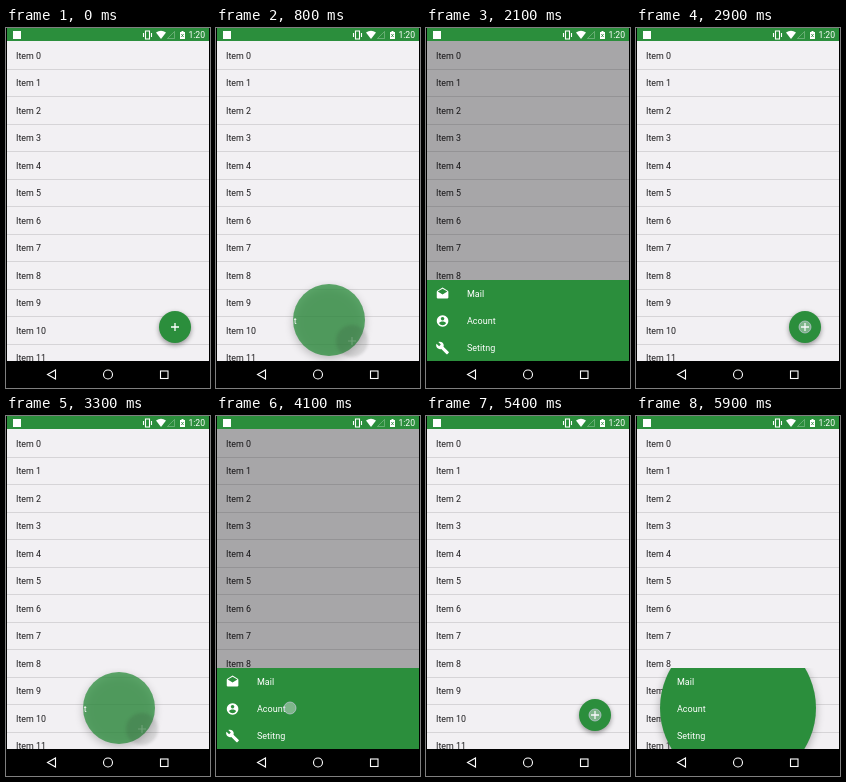
An HTML page with a canvas that plays this animation: 204x360 px, repeating every 6 s.

```html
<!DOCTYPE html>
<html lang="en">
<head>
<meta charset="utf-8">
<title>Button to sheet</title>
<style>
html, body { margin: 0; width: 100%; height: 100%; overflow: hidden; background: #000; }
canvas { display: block; width: 204px; height: 360px; }
</style>
</head>
<body>
<canvas></canvas>
<script>
const W = 204, H = 360, LOOP = 6000, STEP = 100;
const GREEN = '#2b8e3c', PAPER = '#f2f0f3';
const HOME = [169, 299], OUTSIDE = [64, 224], ACCOUNT = [74, 292];
const SHEET = { x: 1, y: 252, w: 202, h: 81 };

// Stages of the morph: button at rest, arc, growing reveal, full sheet
const POSES = [[169, 299, 16], [136, 313, 16], [113, 292, 36], [102, 292, 78], [102, 292, 107], [102, 292, 120]];
const OPENINGS = [400, 2900, 5400], CLOSINGS = [2300, 5000];
const TOUCHES = [
  [400, 700, HOME], [2200, 2400, OUTSIDE], [2900, 3200, HOME],
  [4000, 4300, ACCOUNT], [4800, 5100, OUTSIDE], [5400, 5700, HOME]
];

const ROWS = [
  ['Mail', 'M12 1L3 6.3Q2 7 2 8V18Q2 20 4 20H20Q22 20 22 18V8Q22 7 21 6.3ZM12 13L3.7 7.8 12 3l8.3 4.8Z'],
  ['Acount', 'M12 2a10 10 0 1 0 .01 0ZM12 5a3 3 0 1 1-.01 0ZM6 16c0-2 4-3.1 6-3.1s6 1.1 6 3.1a7.2 7.2 0 0 1-12 0Z'],
  ['Setitng', 'M22.7 19l-9.1-9.1c.9-2.3.4-5-1.5-6.9-2-2-5-2.4-7.4-1.3L9 6 6 9 1.6 4.7c-1.2 2.4-.7 5.4 1.3 7.4 1.9 1.9 4.6 2.4 6.9 1.5l9.1 9.1c.4.4 1 .4 1.4 0l2.3-2.3c.5-.4.5-1.1.1-1.4z']
].map(([label, d]) => [label, new Path2D(d)]);

const canvas = document.querySelector('canvas');
const ctx = canvas.getContext('2d');
const ratio = window.devicePixelRatio || 1;
canvas.width = W * ratio;
canvas.height = H * ratio;

function rect(x, y, w, h, color) {
  ctx.fillStyle = color;
  ctx.fillRect(x, y, w, h);
}

function circle(x, y, r) {
  ctx.beginPath();
  ctx.arc(x, y, r, 0, Math.PI * 2);
}

function text(str, x, y, size, color) {
  ctx.font = `${size}px Roboto, sans-serif`;
  ctx.fillStyle = color;
  ctx.fillText(str, x, y);
}

function shape(d, fill, stroke, width = 1) {
  const path = new Path2D(d);
  if (fill) { ctx.fillStyle = fill; ctx.fill(path); }
  if (stroke) { ctx.strokeStyle = stroke; ctx.lineWidth = width; ctx.stroke(path); }
}

function shadow(blur, dy, alpha) {
  ctx.shadowColor = `rgba(0,0,0,${alpha})`;
  ctx.shadowBlur = blur * ratio;
  ctx.shadowOffsetY = dy * ratio;
}

function drawList() {
  rect(1, 13, 202, 320, PAPER);
  for (let i = 0; i < 12; i++) {
    const y = 13.5 + i * 27.5;
    text('Item ' + i, 10, y + 17, 8.9, '#1c1b1d');
    rect(1, Math.round(y + 27), 202, 1, '#d6d4d7');
  }
}

function drawButton(x, y) {
  ctx.save();
  shadow(5, 2, 0.4);
  circle(x, y, 16);
  ctx.fillStyle = GREEN;
  ctx.fill();
  ctx.restore();
  shape(`M${x - 4} ${y}h8M${x} ${y - 4}v8`, null, '#fff', 1.3);
}

function drawGhost(x, y) {
  ctx.save();
  ctx.filter = 'blur(1.5px)';
  circle(x, y, 16);
  ctx.fillStyle = 'rgba(40,50,45,.14)';
  ctx.fill();
  ctx.restore();
  shape(`M${x - 4} ${y}h8M${x} ${y - 4}v8`, null, 'rgba(255,255,255,.2)', 1.2);
}

function drawSheet([x, y, r], alpha) {
  ctx.save();
  ctx.beginPath();
  ctx.rect(SHEET.x, SHEET.y, SHEET.w, SHEET.h);
  ctx.clip();
  ctx.save();
  ctx.globalAlpha = alpha;
  shadow(9, 3, 0.3);
  circle(x, y, r);
  ctx.fillStyle = GREEN;
  ctx.fill();
  ctx.restore();
  circle(x, y, r);
  ctx.clip();
  ctx.translate(x - 102, 0);
  ROWS.forEach(([label, icon], i) => {
    const mid = 266 + i * 27;
    text(label, 41, mid + 3, 9, '#fff');
    ctx.save();
    ctx.translate(9.6, mid - 7);
    ctx.scale(0.58, 0.58);
    ctx.fill(icon, 'evenodd');
    ctx.restore();
  });
  ctx.restore();
}

function drawTouch([x, y]) {
  circle(x, y, 6);
  ctx.fillStyle = 'rgba(240,238,248,.42)';
  ctx.fill();
  ctx.strokeStyle = 'rgba(205,200,228,.65)';
  ctx.lineWidth = 1;
  ctx.stroke();
}

function drawBars() {
  rect(0, 0, W, 13, '#000');
  rect(1, 0, 202, 13, GREEN);
  rect(7, 3, 8, 8, '#fff');
  shape('M139.5 3h4v8h-4zM137.5 5v4M145.500 5v4', null, '#fff', 1.1);
  shape('M150 4.500Q155 1 160 4.500L155 11Z', '#fff');
  shape('M168.500 3.500v7h-7z', null, 'rgba(255,255,255,.35)', 0.8);
  shape('M174 4h1.500v-1h2v1h1.500v7h-5z', '#fff');
  shape('M175.300 6l2.400 3M177.700 6l-2.400 3', null, GREEN, 0.8);
  ctx.textAlign = 'right';
  text('1:20', 199, 10.2, 8.6, '#fff');
  ctx.textAlign = 'left';

  rect(0, 333, W, 27, '#000');
  shape('M49.500 342v9l-8-4.500z', null, '#fff', 1.1);
  circle(102, 346.5, 4.5);
  ctx.stroke();
  ctx.strokeRect(154.5, 343, 7.5, 7.5);
}

function stageAt(t) {
  const started = list => Math.max(-1, ...list.filter(s => s <= t));
  const opened = started(OPENINGS), closed = started(CLOSINGS);
  if (opened < 0) return 0;
  if (closed > opened) return Math.max(0, 4 - (t - closed) / STEP);
  const stage = Math.max(0, (t - opened) / STEP - 2);
  return stage > 3 ? 5 : stage;
}

function draw(t) {
  const stage = stageAt(t), pose = POSES[stage];
  ctx.setTransform(ratio, 0, 0, ratio, 0, 0);
  rect(0, 0, W, H, '#000');
  drawList();
  if (stage === 5) rect(1, 13, 202, 320, 'rgba(0,0,0,.31)');
  if (stage < 2) drawButton(pose[0], pose[1]);
  else drawSheet(pose, stage === 2 ? 0.74 : 1);
  if (stage === 2) drawGhost(POSES[1][0], POSES[1][1]);
  for (const [from, to, at] of TOUCHES) if (t >= from && t < to) drawTouch(at);
  drawBars();
}

const start = performance.now();
function tick() {
  const t = (performance.now() - start) % LOOP;
  draw(Math.floor(t / STEP) * STEP);
  requestAnimationFrame(tick);
}
tick();
</script>
</body>
</html>
```
